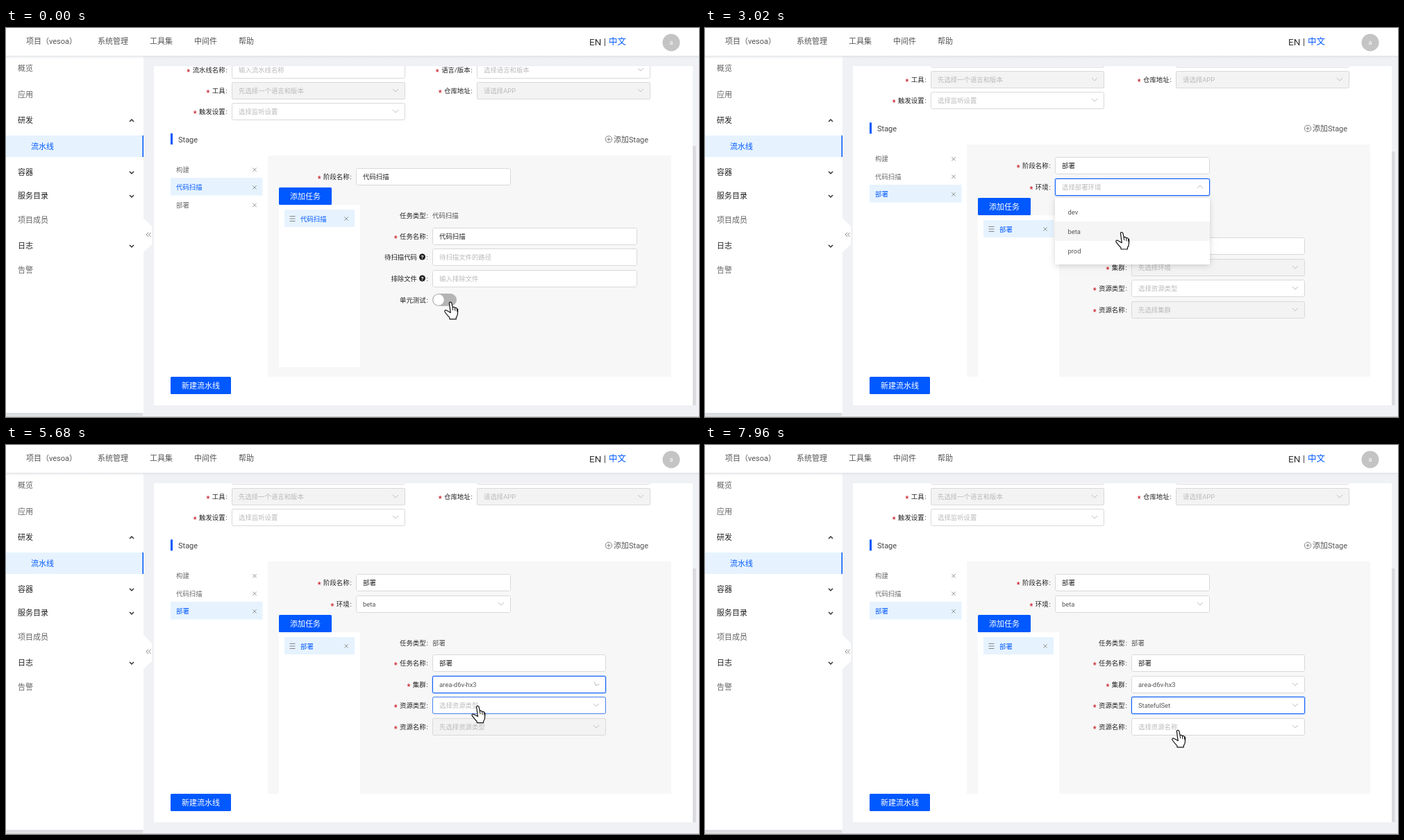
An HTML page with a canvas that plays this animation: 998x561 px, repeating every 8 s.

```html
<!DOCTYPE html>
<html lang="zh-CN">
<head>
<meta charset="utf-8">
<title>流水线</title>
<style>
html, body { margin: 0; width: 100%; height: 100%; overflow: hidden; background: #eff1f4; }
canvas { display: block; }
</style>
</head>
<body>
<canvas id="stage" width="998" height="561"></canvas>
<script>
const ctx = document.getElementById('stage').getContext('2d');
const LOOP = 8000, DEPLOY = 1150;
const BLUE = '#0058ff', PALE = '#e6f3ff', INK = '#222', SOFT = '#666', HINT = '#bababa';
const FONT = 'Roboto, "Noto Sans CJK SC", "Noto Sans CJK", sans-serif';

// time, x, y and shape of the pointer from that time on
const POINTER = [
  [0, 639, 397, 'hand'], [55, 639, 397, 'arrow'], [200, 447, 354, 'arrow'], [330, 447, 354, 'arrow'],
  [790, 310, 263, 'hand'], [940, 276, 257, 'hand'], [1150, 276, 257, 'arrow'], [1450, 276, 257, 'arrow'],
  [1680, 400, 269, 'arrow'], [1930, 560, 238, 'hand'], [2100, 597, 229, 'hand'], [2320, 597, 229, 'beam'],
  [2800, 597, 229, 'hand'], [3150, 600, 326, 'hand'], [3450, 591, 292, 'hand'], [3730, 591, 292, 'arrow'],
  [3860, 591, 292, 'arrow'], [4380, 680, 350, 'hand'], [4730, 680, 350, 'hand'], [4880, 680, 369, 'hand'],
  [4920, 680, 369, 'hand'], [5200, 677, 379, 'hand'], [5600, 677, 379, 'hand'], [5800, 680.5, 376, 'hand'],
  [6230, 680.5, 376, 'beam'], [6500, 680, 376, 'hand'], [6930, 677, 405, 'hand'], [7080, 677, 405, 'hand'],
  [7450, 674, 431, 'hand'], [7700, 674, 431, 'arrow'], [7850, 674, 431, 'hand'], [7950, 680, 413, 'hand']
];
const CLICKS = [[940, 1150], [2100, 2320], [3560, 3730], [4500, 4680], [5360, 5530], [6060, 6230], [7620, 7870]];

let now = 0;

const between = (a, b) => now >= a && now < b;
function ramp(start, length) {
  const p = Math.min(1, Math.max(0, (now - start) / length));
  return p * p * (3 - 2 * p);
}
const pulse = (a, b, length) => Math.min(ramp(a, length), 1 - ramp(b, length));

function rect(x, y, w, h, color) {
  ctx.fillStyle = color;
  ctx.fillRect(x, y, w, h);
}
function disc(x, y, r, color) {
  ctx.fillStyle = color;
  ctx.beginPath();
  ctx.arc(x, y, r, 0, 7);
  ctx.fill();
}
function line(points, color, width = 1) {
  ctx.strokeStyle = color;
  ctx.lineWidth = width;
  ctx.beginPath();
  points.forEach(([x, y]) => ctx.lineTo(x, y));
  ctx.stroke();
}
// y is the middle of the line of text
function text(str, x, y, color = INK, size = 9.4, align = 'left', weight = 400) {
  ctx.font = `${weight} ${size}px ${FONT}`;
  ctx.textAlign = align;
  ctx.fillStyle = color;
  ctx.fillText(str, x, y + size * 0.38);
  return ctx.measureText(str).width;
}
function chevron(x, y, half, depth, color, width, turn = 0) {
  ctx.save();
  ctx.translate(x, y);
  ctx.rotate(turn * Math.PI);
  line([[-half, -depth / 2], [0, depth / 2], [half, -depth / 2]], color, width);
  ctx.restore();
}
function cross(x, y) {
  line([[x - 2.7, y - 2.7], [x + 2.7, y + 2.7]], '#888', 0.9);
  line([[x - 2.7, y + 2.7], [x + 2.7, y - 2.7]], '#888', 0.9);
}
function button(str, x, y, w) {
  ctx.fillStyle = BLUE;
  ctx.beginPath();
  ctx.roundRect(x, y, w, 25, 1.5);
  ctx.fill();
  text(str, x + w / 2, y + 12.5, '#fff', 11, 'center', 500);
}
function label(str, fieldX, y, required = true) {
  const right = fieldX - 9.4;
  const width = text(str, right, y, INK, 9.4, 'right');
  text(':', fieldX - 7.4, y, INK, 9.4, 'center');
  if (required) text('*', right - width - 6, y + 2, '#c8141e', 11, 'center', 500);
}
function border(x, y, w, h, color, width = 1) {
  ctx.strokeStyle = color;
  ctx.lineWidth = width;
  ctx.beginPath();
  ctx.roundRect(x, y, w, h, 2);
  ctx.stroke();
}

function field(name, x, y, w, { value, hint, select, disabled, hover = 0, focus = 0, turn = 0, caret } = {}) {
  const mid = y + 12.5;
  if (name) label(name, x, mid);
  rect(x, y, w, 25, disabled ? '#f3f3f3' : '#fff');
  border(x + 0.5, y + 0.5, w - 1, 24, '#d9d9d9');
  ctx.globalAlpha = Math.max(hover * 0.75, focus * 0.9);
  border(x + 0.5, y + 0.5, w - 1, 24, BLUE);
  ctx.globalAlpha = focus * 0.22;
  border(x, y, w, 25, BLUE, 2);
  ctx.globalAlpha = 1;
  text(value || hint, x + 10, mid, value ? (select ? '#555' : INK) : HINT);
  if (select) chevron(x + w - 14, mid - 0.5, 4, 4, '#bfbfbf', 1, turn);
  if (caret && now % 1000 > 250 && now % 1000 < 950) rect(x + 10, mid - 6, 1, 12, '#333');
}
const select = (name, x, y, w, options) => field(name, x, y, w, { select: true, ...options });

function dropdown(x, y, w, items, alpha, pointerY) {
  if (alpha <= 0) return;
  ctx.save();
  ctx.globalAlpha = alpha;
  ctx.shadowColor = 'rgba(0,0,0,.16)';
  ctx.shadowBlur = 8;
  ctx.shadowOffsetY = 2;
  rect(x, y, w, 12 + 28 * items.length, '#fff');
  ctx.shadowColor = 'transparent';
  const empty = items[0] === '无匹配结果';
  items.forEach((item, i) => {
    const top = y + 6 + 28 * i;
    if (!empty && pointerY >= top && pointerY < top + 28) rect(x, top, w, 28, '#f5f5f5');
    text(item, x + 18.5, top + 14.5, empty ? HINT : '#555');
  });
  ctx.restore();
}

function header() {
  const shade = ctx.createLinearGradient(0, 39, 0, 45);
  shade.addColorStop(0, '#d6d9dc');
  shade.addColorStop(1, 'rgba(239,241,244,0)');
  rect(0, 39, 998, 6, shade);
  rect(0, 0, 998, 40, '#fff');
  text('项目（vesoa）', 29, 19, '#555', 11);
  [['系统管理', 132], ['工具集', 207], ['中间件', 271], ['帮助', 335]]
    .forEach(([str, x]) => text(str, x, 19, '#555', 11));
  text('EN', 840, 19.5, '#333', 13.5);
  text('|', 861, 19.5, '#333', 12.5);
  text('中文', 868, 19.5, BLUE, 12.5);
  disc(958, 21, 12.5, '#c4c4c4');
  text('a', 958, 21, '#fff', 9, 'center');
}

function sidebar() {
  rect(0, 40, 198, 515, '#fff');
  rect(0, 155, 198, 31, PALE);
  rect(196.5, 155, 1.5, 31, BLUE);
  text('流水线', 36, 171, BLUE, 11);
  [['概览', 58], ['应用', 96], ['研发', 133, 1], ['容器', 208, 0], ['服务目录', 242, 0],
   ['项目成员', 277], ['日志', 314, 0], ['告警', 349]].forEach(([str, y, turn]) => {
    const group = turn !== undefined;
    text(str, 17, y, group ? INK : SOFT, 11, 'left', group ? 500 : 400);
    if (group) chevron(181, y + 0.5, 3, 3, '#333', 1.5, turn);
  });
  ctx.fillStyle = '#fff';
  ctx.beginPath();
  [[198, 274], [210, 286], [210, 312], [198, 323]].forEach(([x, y]) => ctx.lineTo(x, y));
  ctx.fill();
  chevron(203.5, 298, 3, 3, '#777', 0.9, 0.5);
  chevron(207, 298, 3, 3, '#777', 0.9, 0.5);
  rect(0, 555, 197, 4.5, '#dcdde0');
  rect(0, 560, 998, 1, '#c9cacd');
}

function taskList(name, y, bottom) {
  button('添加任务', 393, y, 76);
  rect(393, y + 25, 117, bottom - y - 25, '#fff');
  rect(401, y + 32, 101, 25, PALE);
  [-3.5, 0, 3.5].forEach(d => line([[408.5, y + 45 + d], [416.5, y + 45 + d]], '#777', 0.9));
  text(name, 424, y + 45, BLUE);
  cross(490, y + 45);
}

function scanForm() {
  taskList('代码扫描', 230, 489);
  field('阶段名称', 504, 202, 223, { value: '代码扫描' });
  label('任务类型', 614, 270, false);
  text('代码扫描', 614, 270, '#555');
  field('任务名称', 614, 288, 295, { value: '代码扫描' });
  [['待扫描代码', 318, '待扫描文件的路径'], ['排除文件', 349, '输入排除文件']].forEach(([name, y, hint]) => {
    field('', 614, y, 295, { hint });
    text(name, 592, y + 12.5, INK, 9.4, 'right');
    disc(599.5, y + 12, 4.5, INK);
    text('?', 599.5, y + 12, '#fff', 8, 'center', 700);
    text(':', 606.6, y + 12.5, INK, 9.4, 'center');
  });
  label('单元测试', 614, 392, false);
  ctx.fillStyle = '#b4b4b4';
  ctx.beginPath();
  ctx.roundRect(614, 383, 35, 18, 9);
  ctx.fill();
  disc(623, 392, 7.7, '#fff');
}

function deployForm(pointerY) {
  const env = now >= 3730, cluster = now >= 5530, kind = now >= 7640;
  taskList('部署', 245, 503);
  field('阶段名称', 504, 186, 223, { value: '部署' });
  select('环境', 504, 217, 223, {
    value: env && 'beta', hint: '选择部署环境', hover: pulse(1930, 2700, 150),
    focus: pulse(2320, 4680, 260), turn: pulse(2320, 3730, 200), caret: between(2320, 3730)
  });
  label('任务类型', 614, 285, false);
  text('部署', 614, 285, '#555');
  field('任务名称', 614, 302, 250, { value: '部署' });
  select('集群', 614, 333, 250, {
    value: cluster && 'area-d6v-hx3', hint: env ? '选择集群' : '先选择环境', disabled: !env,
    hover: pulse(4300, 4800, 150), focus: pulse(4680, 6330, 250),
    turn: pulse(4680, 5530, 200), caret: between(4680, 5530)
  });
  select('资源类型', 614, 363, 250, {
    value: kind && 'StatefulSet', hint: '选择资源类型', hover: pulse(5560, 6500, 150),
    focus: ramp(6230, 200), turn: pulse(6230, 7640, 200), caret: between(6230, 7640)
  });
  select('资源名称', 614, 394, 250, {
    hint: kind ? '选择资源名称' : cluster ? '先选择资源类型' : '先选择集群',
    disabled: !kind, hover: ramp(7950, 200)
  });
  dropdown(504, 245, 223, ['dev', 'beta', 'prod'], pulse(2320, 3730, 80), pointerY);
  dropdown(614, 361, 250, ['area-d6v-hx3'], pulse(4680, 5530, 80), pointerY);
  dropdown(614, 391, 250, now < 6480 ? ['无匹配结果'] : ['Deployment', 'StatefulSet'],
    pulse(6230, 7640, 80), pointerY);
}

function card(pointerY) {
  const deploy = now >= DEPLOY, shift = deploy ? -15.6 : 0;
  const at = y => Math.round(y + shift);
  rect(213, 55, 776, 489, '#fff');
  rect(989, deploy ? 178 : 170, 4.5, deploy ? 366 : 374, '#d9dadd');

  ctx.save();
  ctx.beginPath();
  ctx.rect(213, 55, 776, 489);
  ctx.clip();
  field('流水线名称', 325, at(48), 250, { hint: '输入流水线名称' });
  select('语言/版本', 678, at(48), 250, { hint: '选择语言和版本' });
  select('工具', 325, at(78), 250, { hint: '先选择一个语言和版本', disabled: true });
  select('仓库地址', 678, at(78), 250, { hint: '请选择APP', disabled: true });
  select('触发设置', 325, at(108), 250, { hint: '选择监听设置' });
  ctx.restore();

  rect(237, 152 + shift, 3, 16, BLUE);
  const titleY = 160.5 + shift;
  text('Stage', 248, titleY, '#444', 11);
  ctx.strokeStyle = '#666';
  ctx.lineWidth = 0.8;
  ctx.beginPath();
  ctx.arc(868, titleY, 4.7, 0, 7);
  ctx.stroke();
  line([[865.3, titleY], [870.7, titleY]], '#666', 0.8);
  line([[868, titleY - 2.7], [868, titleY + 2.7]], '#666', 0.8);
  text('添加Stage', 875, titleY, '#555', 11);

  ['构建', '代码扫描', '部署'].forEach((name, i) => {
    const y = 204.3 + 25.6 * i + shift;
    const active = i === (deploy ? 2 : 1);
    if (active || (i === 2 && between(780, DEPLOY))) rect(237, Math.floor(y - 13), 132.5, 25.6, PALE);
    text(name, 245, y, active ? BLUE : SOFT);
    cross(358, y);
  });

  rect(377, at(184), 581, 503 - at(184), '#f7f7f7');
  button('新建流水线', 237, 503, 87);
  deploy ? deployForm(pointerY) : scanForm();
}

const HAND = new Path2D('M-.6 .2C-1-2 2-2.2 2.8-.3L4.2 6.2C5.2 4.6 7.2 5.2 7.4 7C8.6 5.8 10.2 6.5 10.4 8.2' +
  'C11.5 7.6 11.8 9 11.7 10.2L11.3 15.2Q11.3 18.2 9.3 20.5L9.3 22.8L.1 22.8L-.3 20.4C-3.6 17.7-4.6 15.2-6.8 12.8' +
  'C-8.2 10.6-6 9.2-4.2 10.6L1.2 13.6Z');
const ARROW = new Path2D('M.5 .5V19L4.7 15.2L7.6 22L10.6 20.7L7.7 14.2H13.3Z');
const BEAM = new Path2D('M-5-9.5H-1.5L0-8.5L1.5-9.5H5M0-9V9M-5 9.5H-1.5L0 8.5L1.5 9.5H5');

function pointerAt() {
  const i = POINTER.findLastIndex(key => key[0] <= now);
  const [start, x, y, shape] = POINTER[i];
  const [end, nx, ny] = POINTER[i + 1] || [LOOP, x, y];
  const p = ramp(start, end - start);
  return { x: x + (nx - x) * p, y: y + (ny - y) * p, shape };
}

function drawPointer({ x, y, shape }) {
  if (CLICKS.some(([a, b]) => between(a, b))) disc(x, y, 14, 'rgba(250,238,20,.62)');
  ctx.save();
  ctx.translate(x, y);
  ctx.lineJoin = 'round';
  if (shape === 'beam') {
    ctx.strokeStyle = '#fff';
    ctx.lineWidth = 4;
    ctx.stroke(BEAM);
    ctx.strokeStyle = '#000';
    ctx.lineWidth = 2;
    ctx.stroke(BEAM);
  } else {
    const path = shape === 'hand' ? HAND : ARROW;
    ctx.fillStyle = '#fff';
    ctx.fill(path);
    ctx.strokeStyle = '#111';
    ctx.lineWidth = 1.2;
    ctx.stroke(path);
    if (shape === 'hand') {
      [[4.2, 6.2], [7.4, 7.2], [10.3, 8.2]].forEach(([kx, ky]) => line([[kx, ky], [kx + 0.5, ky + 4]], '#111'));
    }
  }
  ctx.restore();
}

function frame(time) {
  now = time % LOOP;
  const pointer = pointerAt();
  rect(0, 0, 998, 561, '#eff1f4');
  card(pointer.y);
  sidebar();
  header();
  drawPointer(pointer);
  requestAnimationFrame(frame);
}
requestAnimationFrame(frame);
</script>
</body>
</html>
```
